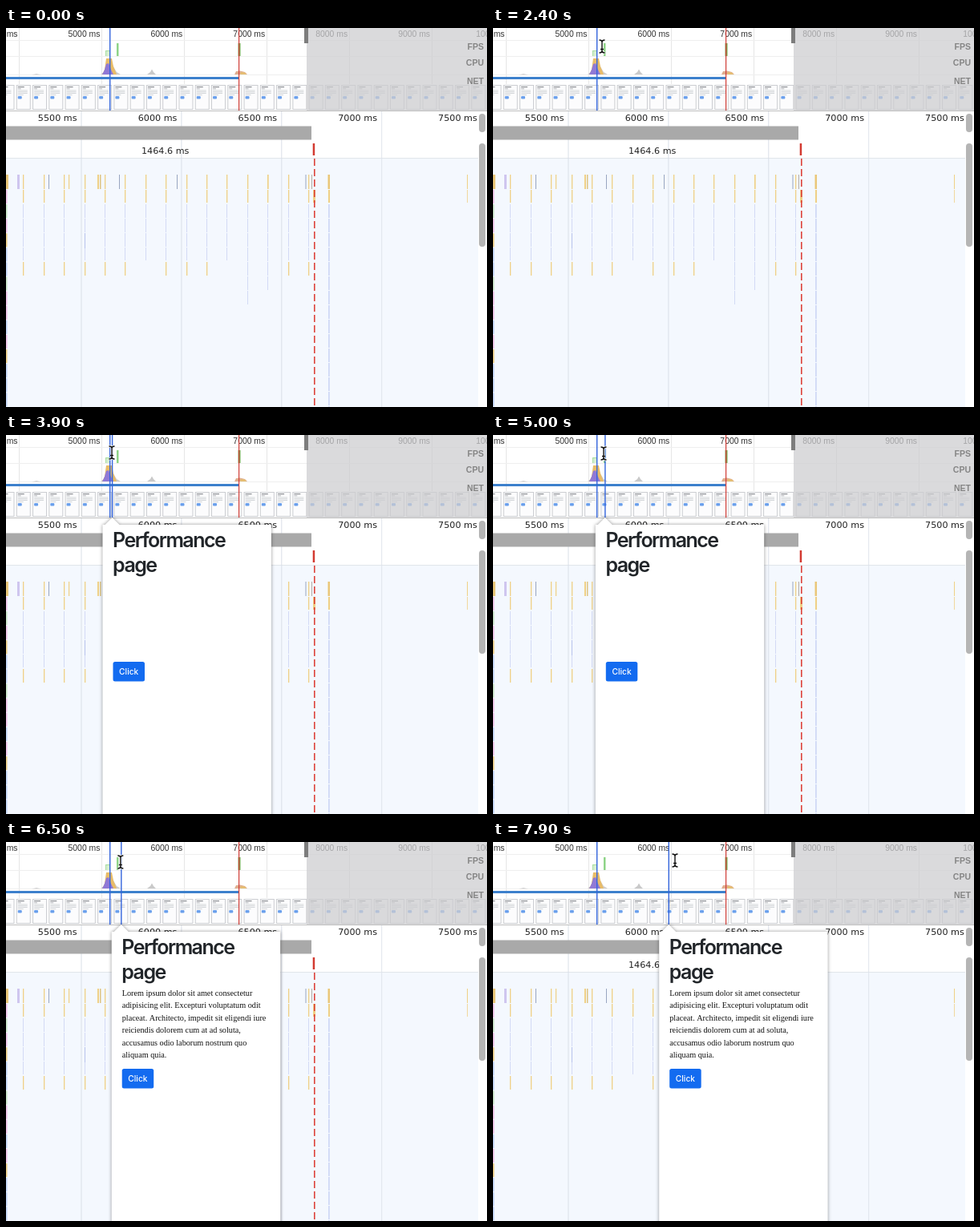
An HTML page with a canvas that plays this animation: 600 px wide and 473 px high, repeating every 8000 ms.

```html
<!DOCTYPE html>
<html lang="en">
<head>
<meta charset="utf-8">
<title>Performance timeline</title>
<style>
html, body { margin: 0; width: 100%; height: 100%; overflow: hidden; background: #fff; }
canvas { display: block; width: 600px; height: 473px; }
</style>
</head>
<body>
<canvas id="stage"></canvas>
<script>
const W = 600, H = 473, LOOP = 8000, STEP = 100;
const POPUP_AT = 2500, TEXT_AT = 5500, CURSOR_AT = 2200;
const SANS = '"Liberation Sans", Arial, sans-serif';
const WIDE = '"DejaVu Sans", Verdana, sans-serif';
const UI = 'Inter, "Liberation Sans", sans-serif';
const SERIF = '"Liberation Serif", Times, serif';
const YELLOW = '#efd086', LILAC = '#d3daf5', PINK = '#f0c4ea', GREEN = '#c9e6c9', BLUE = '#c3d6f8';
const LOREM = [
  'Lorem ipsum dolor sit amet consectetur',
  'adipisicing elit. Excepturi voluptatum odit',
  'placeat. Architecto, impedit sit eligendi iure',
  'reiciendis dolorem cum at ad soluta,',
  'accusamus odio laborum nostrum quo',
  'aliquam quia.'
];
// time, pointer x, pointer y, marker x
const PATH = [
  [2200, 139, 24, 136], [2400, 136, 23, 136], [2900, 133, 22, 133],
  [3900, 132, 22, 132.5], [5000, 138, 23, 139.8], [5900, 141, 25, 142.8],
  [7200, 145, 25, 144.8], [7900, 227, 23, 219.2]
];

const canvas = document.getElementById('stage');
const dpr = window.devicePixelRatio || 1;
canvas.width = W * dpr;
canvas.height = H * dpr;
const screen2d = canvas.getContext('2d');
let g = screen2d;

function rect(x, y, w, h, color) {
  g.fillStyle = color;
  g.fillRect(x, y, w, h);
}

function text(s, x, y, font, color, align = 'left', spacing = 0) {
  g.font = font;
  g.fillStyle = color;
  g.textAlign = align;
  g.letterSpacing = spacing + 'px';
  g.fillText(s, x, y);
}

function poly(points, color) {
  g.fillStyle = color;
  g.beginPath();
  points.forEach(([x, y]) => g.lineTo(x, y));
  g.fill();
}

function round(x, y, w, h, r, color) {
  g.fillStyle = color;
  g.beginPath();
  g.roundRect(x, y, w, h, r);
  g.fill();
}

function thumb(x) {
  rect(x, 71, 18, 31, '#cbcdd1');
  rect(x + 1, 72, 16, 29, '#fcfcfd');
  rect(x + 2, 73, 8, 1.2, '#8b8e93');
  rect(x + 2, 75.3, 4, 1, '#b0b3b7');
  for (let i = 0; i < 4; i++) rect(x + 2, 77.6 + i * 1.8, i === 3 ? 7 : 12, 0.8, '#c9ccd0');
  round(x + 2, 85, 5, 3.5, 1, '#6ba0ec');
}

function overview() {
  rect(0, 0, W, 104, '#fff');
  for (let i = 0; i < 6; i++) rect(16 + i * 103, 0, 1, 70, '#e6e6e6');
  for (const y of [15, 35, 58]) rect(0, y, W, 1, '#efefef');
  for (let i = 0; i < 7; i++)
    text((4 + i) * 1000 + ' ms', 14.5 + i * 102.9, 11, '10.4px ' + SANS, '#333', 'right');

  rect(124, 28, 6, 7, '#a9dda2');
  rect(125, 29, 4, 6, '#d5efd0');
  rect(138, 19, 2.5, 16, '#8fd488');
  rect(289.5, 19, 3, 16, '#76a850');

  poly([[118, 58], [122, 55], [126, 42], [130, 40], [135, 50], [138, 55], [143, 58]], '#cfccca');
  poly([[120, 58], [123, 52], [125, 38], [132, 38], [134, 48], [138, 58]], '#e8bc68');
  poly([[120, 58], [123, 52], [125, 45], [128, 44], [131, 52], [134, 58]], '#9079d6');
  poly([[176, 58], [180, 55], [182, 51.5], [184, 55], [187, 58]], '#c9c9c9');
  poly([[285, 58], [287, 54], [292, 53.5], [298, 55], [301, 58]], '#dfae8f');
  poly([[292, 58], [293, 55], [298, 55.5], [300, 58]], '#e5be72');
  poly([[32, 58.5], [38, 57], [44, 58.5]], '#d4d4d4');

  rect(0, 61, 291, 3, '#3d80cc');
  for (let i = 0; i < 31; i++) thumb(-7.5 + i * 20.27);
  rect(0, 103, W, 1, '#bdbdbd');
  rect(375, 0, 225, 103, 'rgba(206,205,208,.74)');
  rect(372, 0, 5, 19, '#7d7d7d');
  for (const [s, y] of [['FPS', 27], ['CPU', 47], ['NET', 70]])
    text(s, 596, y, 'bold 10.5px ' + SANS, '#858585', 'right');
  rect(290, 0, 1.2, 103, '#cf3d37');
  rect(129, 0, 1.4, 103, '#3465dc');
}

function flames() {
  rect(0, 162, 589, 1, '#e1e5ea');
  rect(0, 163, 589, 310, '#f4f8fe');
  for (let i = 0; i < 4; i++) rect(93.5 + i * 124.9, 104, 1, 369, i === 3 ? '#dfe4ec' : '#d9dfe8');

  const short = { 6: 290, 10: 290, 11: 345, 12: 327 };
  for (let i = 0; i < 15; i++) {
    const x = Math.round(21.4 + i * 25.4);
    rect(x, 183, 1.3, 18, YELLOW);
    rect(x, 202, 1.3, 16, YELLOW);
    const end = short[i] || 290;
    for (let y = 220; y < end; y += 18) rect(x, y, 1, Math.min(17, end - y), LILAC);
    if (!short[i]) rect(x, 292, 1.3, 17, YELLOW);
  }
  rect(98, 256, 1, 19, '#b8c3ec');

  for (const [x, w, c] of [
    [0, 3, '#e9c779'], [14, 3, '#cfc6ef'], [53, 1, '#98a5c0'], [78, 1.2, YELLOW],
    [114, 2, YELLOW], [117, 1.5, '#dcc382'], [141, 1, '#98a5c0'], [213, 1, '#98a5c0'],
    [326, 1.5, YELLOW], [373.5, 1, '#98a5c0'], [381, 1, '#b0a9a4'], [401.5, 2.5, '#eac779'], [575, 1, YELLOW]
  ]) rect(x, 183, w, 18, c);
  rect(383, 202, 3, 16, YELLOW);
  rect(402, 202, 2, 16, YELLOW);
  rect(575, 202, 0.8, 16, YELLOW);
  for (let y = 220; y < H; y += 18) rect(402, y, 1.8, 17, '#d0d9f6');

  const edge = [PINK, GREEN, PINK, YELLOW, BLUE, BLUE, GREEN, PINK, PINK, BLUE, PINK, YELLOW, BLUE, BLUE, BLUE];
  edge.forEach((c, i) => rect(0, 202 + i * 18.1, 1.6, 17, c));
}

function details() {
  rect(0, 104, W, 369, '#fff');
  flames();
  for (let i = 0; i < 5; i++)
    text(5500 + i * 500 + ' ms', 88.6 + i * 124.8, 115.5, '11.2px ' + WIDE, '#222', 'right');
  rect(0, 122.5, 381, 17, '#a9a9a9');
  text('1464.6 ms', 169, 157, '11.2px ' + WIDE, '#222');
  rect(382.7, 144, 2.5, 15, '#d33a31');
  for (let y = 163; y < H; y += 13) rect(384, y, 1.6, 9, '#dc433b');
  round(590, 107, 8, 23, 4, '#b5b5b5');
  round(590, 144, 8, 129, 4, '#b5b5b5');
}

function popup(x, withText) {
  const left = x - 12, right = left + 210.4;
  rect(x - 0.6, 0, 1.4, 103, '#3465dc');
  g.save();
  g.shadowColor = 'rgba(0,0,0,.42)';
  g.shadowBlur = 4 * dpr;
  poly([[left, 480], [left, 112], [x - 9, 112], [x, 103], [x + 9, 112], [right, 112], [right, 480]], '#fff');
  g.restore();
  const tx = left + 13;
  const head = '600 25px ' + UI;
  text('Performance', tx - 0.4, 140, head, '#212529', 'left', -1.55);
  text('page', tx - 0.4, 170.5, head, '#212529', 'left', -1.55);
  if (withText) LOREM.forEach((s, i) => text(s, tx, 192 + i * 15.4, '10.22px ' + SERIF, '#111'));
  round(tx, 283, 39.5, 24.5, 2.5, '#136bf0');
  text('Click', tx + 19.7, 299, '500 10.2px ' + UI, '#fff', 'center');
}

function pointer(x, y) {
  const beam = new Path2D();
  beam.moveTo(x - 3.5, y - 8);
  beam.quadraticCurveTo(x, y - 8, x, y - 5.5);
  beam.quadraticCurveTo(x, y - 8, x + 3.5, y - 8);
  beam.moveTo(x, y - 5.5);
  beam.lineTo(x, y + 5.5);
  beam.quadraticCurveTo(x, y + 8, x - 3.5, y + 8);
  beam.moveTo(x, y + 5.5);
  beam.quadraticCurveTo(x, y + 8, x + 3.5, y + 8);
  beam.moveTo(x - 2, y + 3.5);
  beam.lineTo(x + 2, y + 3.5);
  for (const [w, c] of [[3.2, '#fff'], [1.4, '#111']]) {
    g.lineWidth = w;
    g.strokeStyle = c;
    g.stroke(beam);
  }
}

function pose(t) {
  let i = 0;
  while (i < PATH.length - 2 && t >= PATH[i + 1][0]) i++;
  const a = PATH[i], b = PATH[i + 1];
  let k = Math.min(1, Math.max(0, (t - a[0]) / (b[0] - a[0])));
  if (i === PATH.length - 2) k *= k;
  return [1, 2, 3].map(n => a[n] + (b[n] - a[n]) * k);
}

// the still panels are painted once
const panels = document.createElement('canvas');
panels.width = canvas.width;
panels.height = canvas.height;
g = panels.getContext('2d');
g.scale(dpr, dpr);
details();
overview();
g = screen2d;
g.scale(dpr, dpr);

function draw(now) {
  const t = Math.floor((now % LOOP) / STEP) * STEP;
  const [x, y, mark] = pose(t);
  g.drawImage(panels, 0, 0, W, H);
  if (t >= POPUP_AT) popup(mark, t >= TEXT_AT);
  if (t >= CURSOR_AT) pointer(x, y);
}

let start;
function tick(now) {
  if (start === undefined) start = now;
  draw(now - start);
  requestAnimationFrame(tick);
}
draw(0);
requestAnimationFrame(tick);
</script>
</body>
</html>
```
